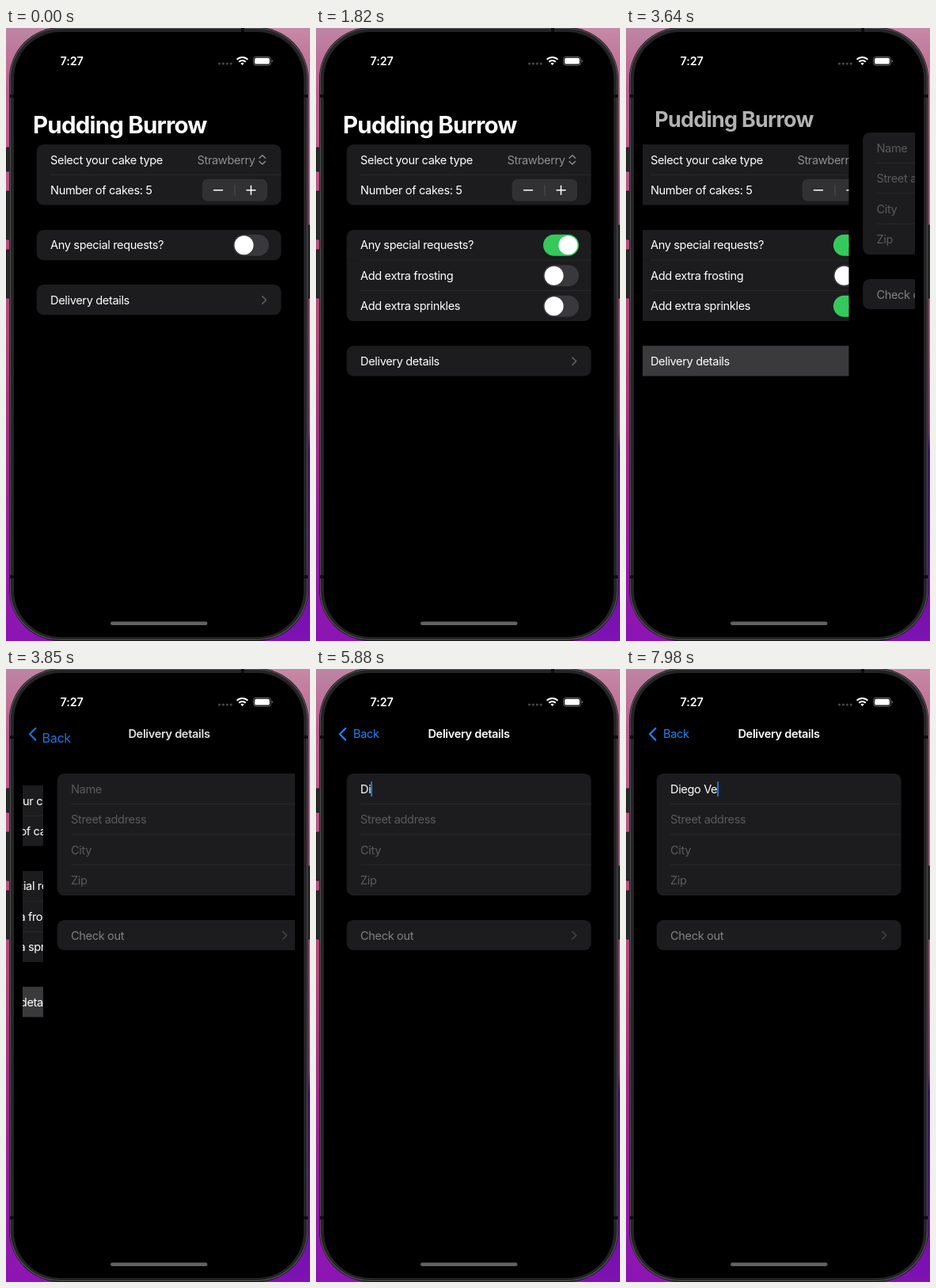
Animation, 384 px wide and 774 px high, one loop 8000 ms. Source, as an HTML page:

```html
<!DOCTYPE html>
<html lang="en">
<head>
<meta charset="utf-8">
<title>Order form</title>
<style>
html, body { margin: 0; width: 100%; height: 100%; overflow: hidden; background: #000; }
svg { display: block; }
text { font: 400 14.6px Inter, "Open Sans", sans-serif; letter-spacing: -.37px; fill: #fff; white-space: pre; }
.big { font-size: 29.5px; font-weight: 700; letter-spacing: -.8px; }
.semi { font-weight: 600; }
.clock { font-size: 14.4px; letter-spacing: -.15px; }
.value { fill: #8e8e93; text-anchor: end; }
.hint { fill: #5a5a5e; }
.off { fill: #808084; }
.mid { text-anchor: middle; }
.blue { fill: #1a84fa; }
.card { fill: #1c1c1e; }
.line { fill: none; stroke-linecap: round; stroke-linejoin: round; }
.rule { stroke: #2b2b2e; stroke-width: .9; }
</style>
</head>
<body>
<svg id="stage" width="384" height="774" viewBox="0 0 384 774">
  <defs>
    <linearGradient id="left" x2="0" y2="1">
      <stop offset="0" stop-color="#bd86a4"/>
      <stop offset=".1" stop-color="#bd6090"/>
      <stop offset=".5" stop-color="#b24a78"/>
      <stop offset=".68" stop-color="#a53086"/>
      <stop offset=".85" stop-color="#9420a4"/>
      <stop offset="1" stop-color="#8c14b4"/>
    </linearGradient>
    <linearGradient id="right" x2="0" y2="1">
      <stop offset="0" stop-color="#c58aa6"/>
      <stop offset=".1" stop-color="#c0628e"/>
      <stop offset=".5" stop-color="#a84c7c"/>
      <stop offset=".66" stop-color="#8f3a80"/>
      <stop offset=".69" stop-color="#4c0c90"/>
      <stop offset="1" stop-color="#7f12b4"/>
    </linearGradient>
    <clipPath id="screen"><rect x="21" y="0" width="344" height="774"/></clipPath>
  </defs>

  <rect width="192" height="774" fill="url(#left)"/>
  <rect x="192" width="192" height="774" fill="url(#right)"/>
  <g fill="#29292b" stroke="#111" stroke-width=".8">
    <rect x="0" y="151" width="6" height="30" rx="1"/>
    <rect x="0" y="206" width="6" height="61" rx="1"/>
    <rect x="0" y="280" width="6" height="61" rx="1"/>
    <rect x="379" y="249" width="6" height="92" rx="1"/>
  </g>
  <rect x="4" y="-1" width="378" height="775" rx="65" fill="#0c0c0d"/>
  <rect x="5.3" y=".5" width="375.4" height="772" rx="63.5" fill="#242426" stroke="#565658" stroke-width="1.2"/>
  <path d="M5 86h5M376 86h5M5 693h5M376 693h5M299 0v5" stroke="#0e0e0f" stroke-width="4"/>
  <rect x="10" y="5" width="366" height="764" rx="59"/>

  <g clip-path="url(#screen)">
    <g id="order"></g>
    <g id="details"></g>
  </g>
  <text id="shop" class="big">Pudding Burrow</text>
  <g id="nav">
    <path id="arrow" class="line" d="M37.3 75l-7.3 7.3 7.3 7.3" stroke="#1a84fa" stroke-width="2.2"/>
    <text id="back" class="blue">Back</text>
    <text id="heading" class="semi mid" x="193" y="87.4">Delivery details</text>
  </g>

  <text class="semi clock" x="68.6" y="46.7">7:27</text>
  <g fill="#48484a">
    <circle cx="269.5" cy="45" r="1.6"/><circle cx="274.4" cy="45" r="1.6"/>
    <circle cx="279.3" cy="45" r="1.6"/><circle cx="284.2" cy="45" r="1.6"/>
  </g>
  <g fill="none" stroke="#fff" stroke-width="2">
    <path d="M291.6 39.9a9.6 9.6 0 0 1 13.8 0M294.2 42.7a6 6 0 0 1 8.6 0"/>
    <path d="M296.4 44.7a3 3 0 0 1 4.2 0l-2.1 2.2z" fill="#fff" stroke="none"/>
  </g>
  <rect x="312.5" y="36.3" width="22" height="10.8" rx="3.4" fill="none" stroke="#6c6c6e"/>
  <rect x="314" y="37.8" width="19" height="7.8" rx="2.2" fill="#fff"/>
  <path d="M335.8 40v3.6q1.4-.6 1.4-1.8t-1.4-1.8z" fill="#6c6c6e"/>
  <rect x="132" y="749.4" width="122.5" height="4.6" rx="2.3" fill="#626264"/>
</svg>

<script>
const LOOP = 8000, TICK = 70, WIDTH = 344;
const SHOP_Y = 132.8, NAV_Y = 87.4;
const typed = [[5390, "D"], [5880, "Di"], [6090, "Die"], [6300, "Dieg"],
               [6510, "Diego"], [7000, "Diego "], [7420, "Diego V"], [7910, "Diego Ve"]];

const $ = id => document.getElementById(id);
const set = (id, attrs) => {
  for (const key in attrs) $(id).setAttribute(key, attrs[key]);
};
const clamp = x => Math.min(1, Math.max(0, x));
const smooth = x => (x = clamp(x), x * x * (3 - 2 * x));
const mix = (a, b, p) => a + (b - a) * p;

// Parts of the list; y is the middle of a row
const label = (y, words, cls = "") => `<text class="${cls}" x="56" y="${y + 5.2}">${words}</text>`;
const card = (y, h, id = "") => `<rect id="${id}" class="card" x="38.7" y="${y}" width="308.8" height="${h}" rx="8.8"/>`;
const rule = y => `<path class="rule" d="M56 ${y}H347.5"/>`;
const chevron = (y, color) =>
  `<path class="line" d="M323.8 ${y - 4.6}l4.8 4.6-4.8 4.6" stroke="${color}" stroke-width="1.7"/>`;
const toggle = (y, id) =>
  `<rect id="${id}Track" x="287" y="${y - 13.5}" width="45" height="27" rx="13.5" fill="#39393d"/>
   <circle id="${id}Knob" cx="300.6" cy="${y}" r="12" fill="#fff"/>`;

$("order").innerHTML =
  card(147, 76.5) + rule(185.3) +
  label(166.3, "Select your cake type") +
  `<text class="value" x="314.7" y="171.5">Strawberry</text>
   <path class="line" d="M320 164.2l3.8-3.4 3.8 3.4M320 168.6l3.8 3.4 3.8-3.4" stroke="#8e8e93" stroke-width="1.4"/>` +
  label(204.7, "Number of cakes: 5") +
  `<rect x="247.6" y="190.8" width="82.4" height="28" rx="7" fill="#313134"/>
   <path d="M289 198v14" stroke="#4e4e52"/>
   <path class="line" d="M262.5 204.8h11M304 204.8h11M309.5 199.3v11" stroke="#fff" stroke-width="1.5"/>` +
  `<g id="extras">
     <path class="card" d="M38.7 293.2h308.8v68a8.8 8.8 0 0 1-8.8 8.8h-291.2a8.8 8.8 0 0 1-8.8-8.8z"/>` +
     rule(331.6) +
     label(312.8, "Add extra frosting") + toggle(312.8, "frost") +
     label(351.2, "Add extra sprinkles") + toggle(351.2, "sprinkle") +
  `</g>` +
  card(255, 38.2) +
  `<g id="square"><path class="card" d="M38.7 280h308.8v13.2h-308.8z"/>${rule(293.2)}</g>` +
  label(274.2, "Any special requests?") + toggle(274.2, "special") +
  `<g id="delivery">` + card(324, 38.3, "link") +
  label(343.5, "Delivery details") + chevron(343.5, "#5c5c60") + `</g>`;

$("details").innerHTML =
  `<rect x="21" y="60" width="${WIDTH}" height="680"/>` +
  card(132, 154) + rule(170.4) + rule(208.7) + rule(247.2) +
  `<text id="name" x="56" y="156.9"></text>
   <rect id="caret" y="142" width="1.7" height="19.2" rx=".8" class="blue"/>` +
  label(190, "Street address", "hint") + label(228.6, "City", "hint") + label(267, "Zip", "hint") +
  card(317, 38) + label(336.3, "Check out", "off") + chevron(336.3, "#404044");

function drawToggle(id, t, start) {
  const fade = t < start ? 0 : 1 - Math.exp(-(t - start + 30) / 218);
  const rgb = [mix(57, 52, fade), mix(57, 202, fade), mix(61, 90, fade)].map(Math.round);
  set(id + "Track", { fill: `rgb(${rgb})` });
  set(id + "Knob", { cx: mix(300.6, 318.4, smooth((t - start + 70) / 210)) });
}

function drawPush(t) {
  // Critically damped spring
  const s = Math.max(0, t - 3580) * .0157;
  const p = t >= 4200 ? 1 : 1 - (1 + s) * Math.exp(-s);
  const q = p > .99 ? 1 : mix(.72 * p, p, clamp((p - .5) * 2));
  const x = mix(34, 47, q), y = mix(SHOP_Y, NAV_Y, q);
  set("order", { transform: `translate(${-.3 * WIDTH * p} 0)` });
  set("details", { transform: `translate(${WIDTH * (1 - p)} 0)` });
  set("shop", { transform: `translate(${x} ${y}) scale(${1 - .5 * q})`, opacity: clamp(1 - 1.25 * p) });
  set("back", { transform: `translate(${x} ${y}) scale(${2 - q})` });
  set("heading", { transform: `translate(${WIDTH / 2 * (1 - p)} 0)` });
  set("nav", { opacity: clamp((p - .35) / .65) });
}

function drawName(t) {
  const entry = typed.filter(([at]) => t >= at).pop();
  const name = $("name");
  name.textContent = entry ? entry[1] : "Name";
  set("name", { class: entry ? "" : "hint" });
  set("caret", {
    x: 56 + (entry ? name.getComputedTextLength() : 0),
    opacity: t >= 4760 ? 1 : 0
  });
}

function draw(now) {
  const t = Math.floor(now % LOOP / TICK) * TICK;
  const open = smooth((t - 770) / 310);
  drawToggle("special", t, 770);
  drawToggle("sprinkle", t, 2450);
  set("extras", { opacity: open });
  set("square", { opacity: open });
  set("delivery", { transform: `translate(0 ${77.2 * open})` });
  $("link").style.fill = t >= 3500 ? "#3a3a3c" : "";
  drawPush(t);
  drawName(t);
}

function loop() {
  draw(performance.now());
  requestAnimationFrame(loop);
}
loop();
</script>
</body>
</html>
```
